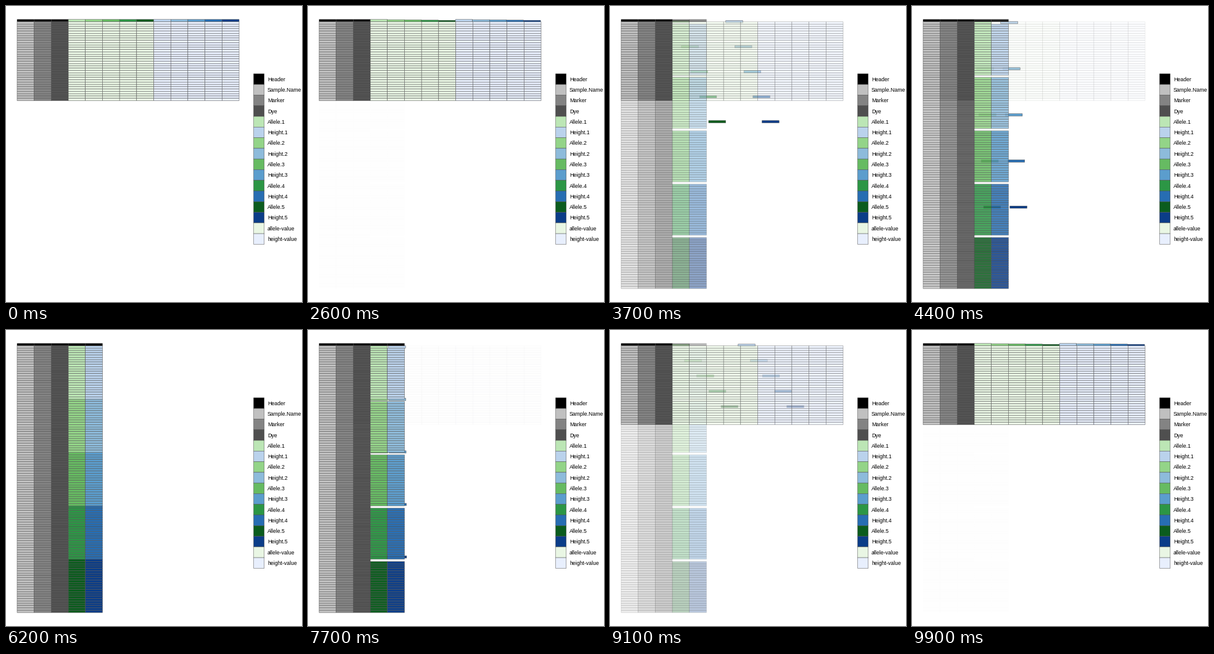
A matplotlib script that plays this animation: 480x480 px, repeating every 10 s.

```python
import numpy as np
import matplotlib.pyplot as plt
from matplotlib.animation import FuncAnimation
from matplotlib.collections import PolyCollection
from matplotlib.colors import to_rgb
from matplotlib.patches import Rectangle

SIZE, FRAMES, PHASE = 480, 100, 25
PX = 0.72                          # points per pixel at 100 dpi
GROUP, WIDE_ROWS = 23, 35          # rows per stacked group, rows of the wide table
TALL_ROWS = 1 + 5 * GROUP
CELL_W, CELL_H = 360 / 13, SIZE / 1.1 / TALL_ROWS
LEFT, TOP = 18, SIZE / 22
EDGE, EDGE_W = "#505050", 0.5

GREYS = ["#C0C0C0", "#838383", "#4F4F4F"]
GREENS = ["#BCE6B5", "#93D488", "#66BB62", "#2C9645", "#0B5C1E"]
BLUES = ["#BAD2EC", "#8DBBDB", "#5B9DCD", "#276DB2", "#0B3D88"]
ALLELE, HEIGHT, HEADER = "#E9F6E4", "#E8EFFD", "#000000"


def cells(items):
    """Split (col, row, colour) items into positions and colours."""
    pos = np.array([(c, r) for c, r, _ in items], float)
    rgb = np.array([to_rgb(colour) for _, _, colour in items])
    return pos, rgb


def column_cells(rows):
    return [(c, r, GREYS[c] if r else HEADER) for r in rows for c in range(3)]


# Cells that stay in both layouts; the ten coloured headings move.
fixed = column_cells(range(WIDE_ROWS))
start = [(3 + k, 0, GREENS[k]) for k in range(5)]
start += [(8 + k, 0, BLUES[k]) for k in range(5)]
end = [(3, 1 + GROUP * k, GREENS[k]) for k in range(5)]
end += [(4, 1 + GROUP * k, BLUES[k]) for k in range(5)]
keep_a, keep_rgb = cells(fixed + start)
keep_b, _ = cells(fixed + end)

# Cells found only in one layout.
wide_pos, wide_rgb = cells([(c, r, ALLELE if c < 8 else HEIGHT)
                            for r in range(1, WIDE_ROWS) for c in range(3, 13)])
tall = column_cells(range(WIDE_ROWS, TALL_ROWS))
tall += [(3, 0, HEADER), (4, 0, HEADER)]
for k in range(5):
    for i in range(1, GROUP):
        row = 1 + GROUP * k + i
        tall += [(3, row, GREENS[k]), (4, row, BLUES[k])]
tall_pos, tall_rgb = cells(tall)

CORNERS = np.array([(0, 0), (1, 0), (1, 1), (0, 1)])


def quads(pos):
    return (pos[:, None] + CORNERS) * (CELL_W, CELL_H) + (LEFT, TOP)


def with_alpha(rgb, alpha):
    return np.column_stack([rgb, np.full(len(rgb), alpha)])


def ease(t):
    return (1 - np.cos(np.pi * t)) / 2


def progress(i):
    """0 for the wide table, 1 for the tall one."""
    phase, step = divmod(i, PHASE)
    t = ease(step / PHASE)
    return (0, t, 1, 1 - t)[phase]


fig = plt.figure(figsize=(4.8, 4.8), dpi=100, facecolor="white")
ax = fig.add_axes([0, 0, 1, 1])
ax.set_xlim(0, SIZE)
ax.set_ylim(SIZE, 0)
ax.axis("off")

tiles = PolyCollection([], linewidths=EDGE_W * PX, snap=False)
ax.add_collection(tiles, autolim=False)


def draw_legend():
    entries = [("Header", HEADER)]
    entries += zip(("Sample.Name", "Marker", "Dye"), GREYS)
    for k in range(5):
        entries += [(f"Allele.{k + 1}", GREENS[k]), (f"Height.{k + 1}", BLUES[k])]
    entries += [("allele-value", ALLELE), ("height-value", HEIGHT)]
    key = 17.28
    for n, (label, colour) in enumerate(entries):
        y = 109.9 + n * key
        ax.add_patch(Rectangle((401.5, y), key, key, facecolor=colour,
                               edgecolor=EDGE, linewidth=EDGE_W * PX, snap=False))
        ax.text(424, y + key / 2 + 3.2, label, family="Liberation Sans",
                size=8.8 * PX, color="black", va="baseline")


def update(i):
    p = progress(i)
    keep = (keep_a + (keep_b - keep_a) * p, keep_rgb, 1)
    wide_layer = (wide_pos, wide_rgb, 1 - p)
    tall_layer = (tall_pos, tall_rgb, p)
    # Cells that fade in lie above those that fade out.
    if i < 2 * PHASE:
        layers = [keep, wide_layer, tall_layer]
    else:
        layers = [keep, tall_layer, wide_layer]
    layers = [layer for layer in layers if layer[2] > 0]
    edge = np.array(to_rgb(EDGE))
    tiles.set_verts(np.concatenate([quads(pos) for pos, _, _ in layers]))
    tiles.set_facecolor(np.concatenate([with_alpha(rgb, a) for _, rgb, a in layers]))
    tiles.set_edgecolor(np.concatenate(
        [with_alpha(np.tile(edge, (len(pos), 1)), a) for pos, _, a in layers]))
    return [tiles]


draw_legend()
anim = FuncAnimation(fig, update, frames=FRAMES, interval=100,
                     init_func=lambda: update(0), repeat=True, repeat_delay=0)
plt.show()
```
